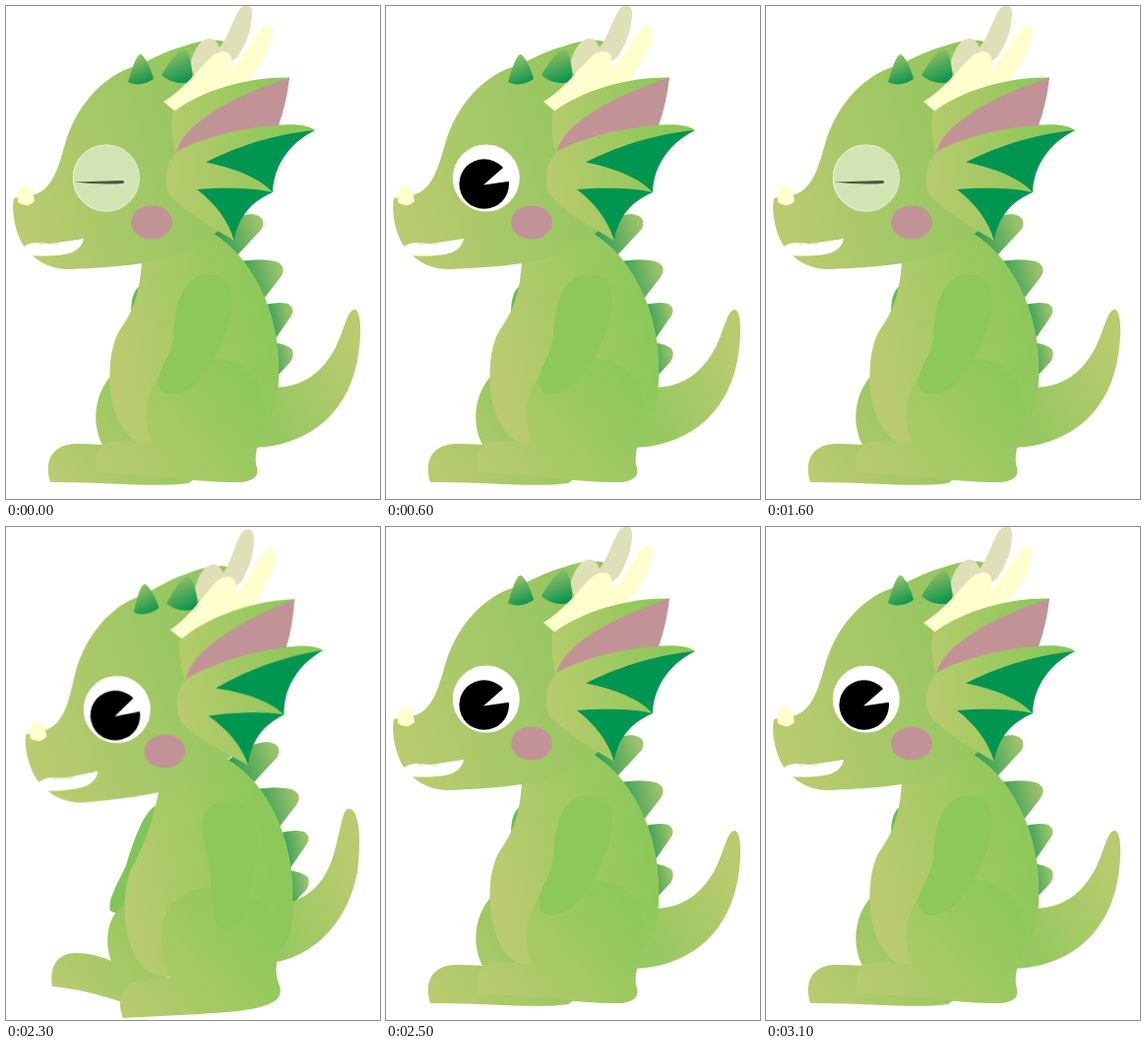
Write an HTML page that moves like this. It is 380 px wide and 500 px high and loops after 4100 ms.

```html
<!DOCTYPE html>
<html lang="en">
<head>
<meta charset="utf-8">
<title>Little dragon</title>
<style>
  html, body { margin: 0; width: 100%; height: 100%; overflow: hidden; background: #fff; }
  svg { display: block; width: 380px; height: 500px; }
  #standing, #sitting, #lid { visibility: hidden; }
  #head { transform-origin: 102.5px 174.5px; }
</style>
</head>
<body>
<svg viewBox="0 0 380 500">
  <defs>
    <linearGradient id="skin" gradientUnits="userSpaceOnUse" x1="8" y1="215" x2="225" y2="150">
      <stop offset="0" stop-color="#bbcb70"/><stop offset=".55" stop-color="#a3c867"/><stop offset="1" stop-color="#92c65e"/>
    </linearGradient>
    <linearGradient id="ear" gradientUnits="userSpaceOnUse" x1="165" y1="160" x2="285" y2="145">
      <stop offset="0" stop-color="#b8cb6e"/><stop offset="1" stop-color="#8dc85a"/>
    </linearGradient>
    <linearGradient id="belly" gradientUnits="userSpaceOnUse" x1="112" y1="370" x2="270" y2="340">
      <stop offset="0" stop-color="#bccb71"/><stop offset="1" stop-color="#8dc85a"/>
    </linearGradient>
    <linearGradient id="leg" gradientUnits="userSpaceOnUse" x1="120" y1="490" x2="255" y2="385">
      <stop offset="0" stop-color="#b8cb6f"/><stop offset="1" stop-color="#8cc85a"/>
    </linearGradient>
    <linearGradient id="backLeg" gradientUnits="userSpaceOnUse" x1="50" y1="480" x2="150" y2="395">
      <stop offset="0" stop-color="#bacb70"/><stop offset="1" stop-color="#94c75e"/>
    </linearGradient>
    <linearGradient id="tail" gradientUnits="userSpaceOnUse" x1="265" y1="400" x2="355" y2="360">
      <stop offset="0" stop-color="#98c861"/><stop offset="1" stop-color="#b8cb6f"/>
    </linearGradient>
    <linearGradient id="spike" x1="0" y1=".6" x2="1" y2=".35">
      <stop offset=".15" stop-color="#2d9c56"/><stop offset=".95" stop-color="#9bc26c"/>
    </linearGradient>
    <linearGradient id="crest" x1=".65" y1=".95" x2=".35" y2=".1">
      <stop offset="0" stop-color="#109650"/><stop offset="1" stop-color="#8fbe64"/>
    </linearGradient>
    <g id="spikes" fill="url(#spike)">
      <path d="M205 235Q225 212 250 211Q265 213 260 226L233 255Z"/>
      <path d="M232 260Q258 255 274 259Q286 264 279 275L258 302Z"/>
      <path d="M260 304Q275 299 287 302Q294 307 290 314L272 340Z"/>
      <path d="M262 340Q286 342 291 349Q293 355 289 361L274 377H262Z"/>
    </g>
  </defs>

  <g id="standing">
    <path fill="url(#tail)" d="M250 448C300 447 345 420 357 360C362 332 361 308 354 308C347 308 343 330 335 346C318 378 295 388 265 387Z"/>
    <use href="#spikes"/>
    <path fill="#66b956" d="M139 282Q127 287 127 311L142 303Z"/>
    <path fill="url(#backLeg)" d="M110 372C92 388 85 420 98 445Q85 444 72 444C48 444 38 460 45 483C100 482 150 489 185 484L205 470L150 420Z"/>
    <path fill="url(#belly)" d="M138 250C138 285 130 308 118 325C103 345 103 385 110 408C117 432 130 444 148 448L240 450L262 425C272 415 276 405 277 380C281 320 255 258 210 230Z"/>
    <path fill="url(#leg)" d="M92 473C90 450 97 441 115 441C125 441 138 444 148 443C134 405 148 360 195 357C240 355 264 374 264 422C258 440 252 450 254 465C258 475 254 481 240 483C200 484 140 474 92 473Z"/>
    <path fill="#8cc85a" d="M200 273C222 270 232 283 230 305C226 335 210 365 190 385C172 398 155 398 155 378C158 362 168 355 170 335C172 305 178 277 200 273Z"/>
  </g>

  <g id="sitting">
    <use href="#spikes" x="16" y="7"/>
    <path fill="url(#tail)" d="M270 442C312 436 347 402 357 350C361 320 360 286 348 285.500C341 287 340 310 332 335C322 365 305 376 285 382Z"/>
    <path fill="#80c45a" d="M156 281C140 285 130 318 122 343C113 363 103 378 106 389C112 394 118 390 122 385L155 330Z"/>
    <path fill="url(#backLeg)" d="M125 380C103 390 99 420 107 440Q88 432 72 432C52 432 44 445 47 466C70 468 95 474 118 482L165 460Z"/>
    <path fill="url(#belly)" d="M157 257C152 292 140 325 126 349C116 382 120 419 136 443C144 453 156 456 168 457L254 457L276 432C288 422 291 412 291 387C296 330 272 262 224 235L200 225Z"/>
    <path fill="url(#leg)" d="M119 498C114 486 114 467 130 462Q150 458 168 457C148 415 155 374 202 366C245 363 276 382 279 425C274 440 273 452 277 463C283 477 274 483 254 488C225 494 170 495 119 498Z"/>
    <path fill="#8cc85a" d="M222 278C245 277 256 295 255 320C254 350 247 380 238 400C230 412 215 410 211 395C208 370 210 350 203 325C196 300 198 280 222 278Z"/>
  </g>

  <g id="head">
    <path fill="url(#skin)" d="M19 245C10 232 5 210 8 195C17 193 28 193 36 188C50 178 54 160 60 140C70 105 95 73 128 62C148 55 160 46 180 41Q205 32 222 36L235 130L218 226C185 255 150 264 62 267C45 266 34 260 27 253L79 236Z"/>
    <path fill="#fff" d="M15 246Q24 239 32 240Q46 242 57 240Q68 239 79 236Q76 252 50 253Q38 254 26 253Z"/>
    <path fill="#e3e8d3" d="M32 240Q34 244 38 242L40 240ZM47 241Q50 245 55 240Z"/>
    <path fill="#feffcc" d="M12 199C11 188 14 181 19 182C24 183 28 189 29 198Q21 206 12 199Z"/>
    <path fill="#dfe0b8" d="M187 60C190 45 198 33 207 33C212 33 214 36 217 42C224 35 230 15 236 5C240 -2 250 -4 250 7C250 25 243 40 235 52L195 78Z"/>
    <path fill="url(#crest)" d="M124 77C128 65 132 49 137 49C142 52 148 65 150 74C142 80 130 81 124 77Z"/>
    <path fill="url(#crest)" d="M158 70C165 58 175 43 182 43.500C187 48 190 65 189 76C180 81 165 77 158 70Z"/>
    <path fill="#feffcc" d="M160 97C180 85 195 65 208 52C216 45 226 44 229 52C229 57 228 61 229 64C240 55 250 35 258 25C263 17 271 18 271 27C269 45 258 60 246 76C220 82 195 92 173 108Z"/>
    <path fill="url(#ear)" d="M169 108C200 85 245 72 288 72.500L275 121C298 119 309 122 314 126C285 140 270 165 271 189C250 195 237 212 232 238C205 222 180 208 165 190C160 170 165 155 173 149C168 135 168 120 169 108Z"/>
    <path fill="#c29396" d="M173 148C182 118 230 92 288 72.500Q285 99 277 121C240 123 200 133 173 148Z"/>
    <path fill="#009550" d="M203 158.500C232 144 270 130 314 126C290 138 272 160 271 189C258 175 235 165 203 158.500ZM194 186C220 184 250 184 271 189C250 198 236 213 232 238C225 216 212 200 194 186Z"/>
    <ellipse cx="148" cy="219.500" rx="21" ry="17" fill="#c29396"/>
    <circle cx="101.800" cy="174.500" r="34" fill="#fff"/>
    <g id="pupil">
      <circle cx="99.700" cy="180.500" r="25.300"/>
      <path fill="#fff" d="M99 181.500L119 164L130 162L127 177.500Z"/>
    </g>
    <g id="lid">
      <circle cx="102" cy="174.500" r="33.500" fill="#d3e4b4"/>
      <path fill="#4c584c" d="M69 178.500L117 177Q122 177 119 180Q95 181.500 69 178.500Z"/>
    </g>
  </g>
</svg>
<script>
  const LOOP = 4100;
  const STEPS = [
    [0, 'blink'], [200, 'stand'], [400, 'blink'], [600, 'stand'], [1600, 'blink'],
    [1800, 'stand'], [2300, 'sit'], [2500, 'stand'], [2900, 'sit'], [3100, 'stand']
  ];

  // Plays one property as hard steps, its value chosen by the pose.
  function play(id, property, valueFor) {
    const frames = STEPS.map(([time, pose]) =>
      ({ offset: time / LOOP, [property]: valueFor(pose), easing: 'steps(1, end)' }));
    frames.push({ offset: 1, [property]: valueFor(STEPS[0][1]) });
    const animation = document.getElementById(id)
      .animate(frames, { duration: LOOP, iterations: Infinity });
    animation.startTime = document.timeline.currentTime;
  }

  const showWhen = test => pose => test(pose) ? 'visible' : 'hidden';

  play('head', 'transform', pose =>
    pose === 'sit' ? 'translate(11px, 10.5px) rotate(-3.1deg)' : 'translate(0px, 0px) rotate(0deg)');
  play('standing', 'visibility', showWhen(pose => pose !== 'sit'));
  play('sitting', 'visibility', showWhen(pose => pose === 'sit'));
  play('pupil', 'visibility', showWhen(pose => pose !== 'blink'));
  play('lid', 'visibility', showWhen(pose => pose === 'blink'));
</script>
</body>
</html>
```
